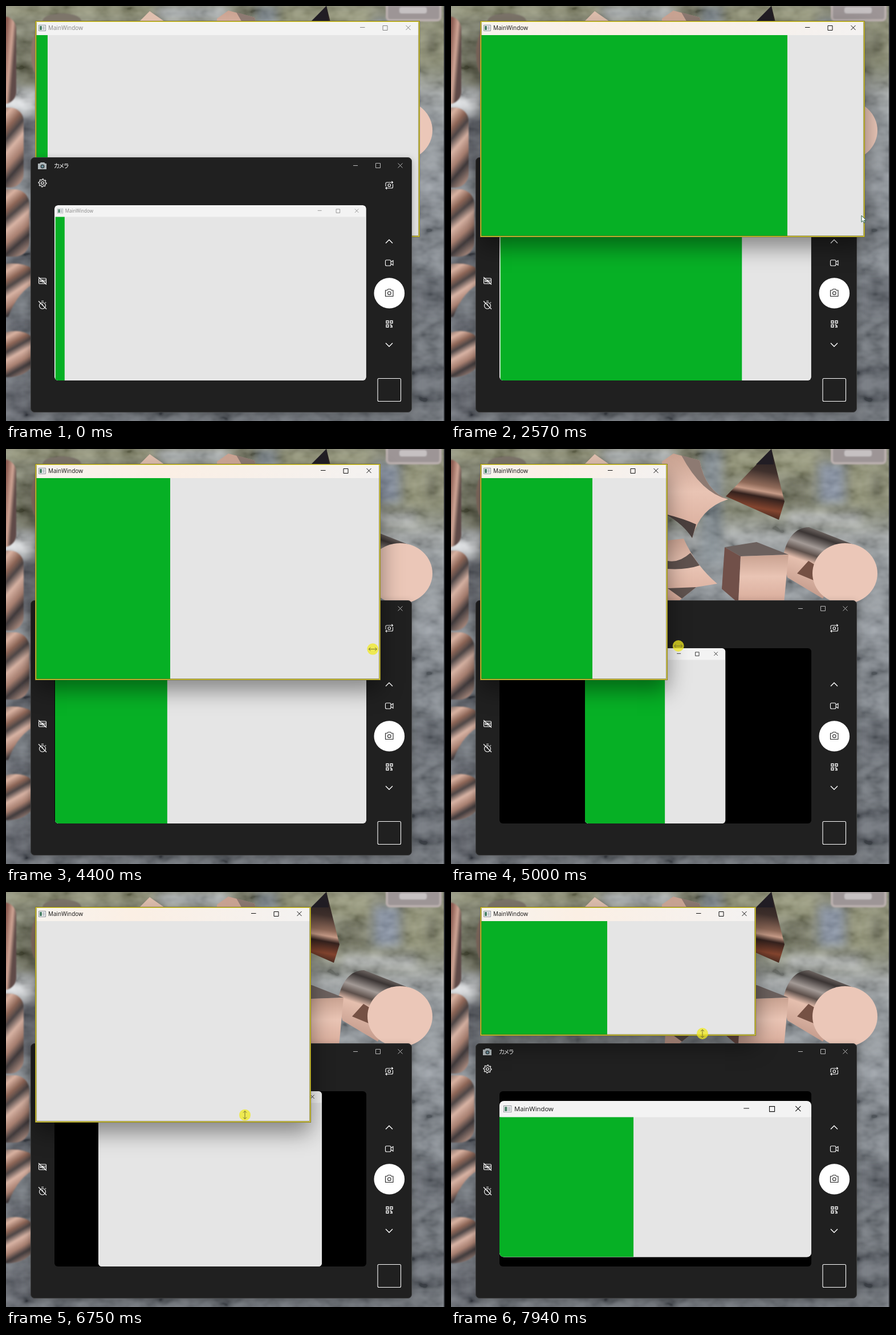
These frames come from a looping animation (770x727 px, 8 s). An HTML page:

```html
<!DOCTYPE html>
<html lang="ja">
<head>
<meta charset="utf-8">
<title>MainWindow</title>
<style>
html, body { margin: 0; width: 100%; height: 100%; overflow: hidden; background: #555a60; }
svg { position: absolute; display: block; }
#backdrop, #pointer { left: 0; top: 0; }
#pointer { z-index: 4; }
.win { position: absolute; box-sizing: border-box; overflow: hidden; display: flex; flex-direction: column; background: #f3f3f3; }
.title { position: relative; flex: 0 0 23px; background: #f3f3f3; color: #858585; font: 10px/20px "Open Sans", "Noto Sans", sans-serif; }
.title span { position: absolute; left: 21px; top: 0; }
.title .app { left: 4px; top: 5px; }
.title .buttons { right: 0; top: 0; fill: none; stroke: currentColor; }
.active .title { color: #111; }
.area { flex: 1; background: #e5e5e5; }
.bar { height: 100%; background: #06b025; }
#main { left: 51px; top: 26px; z-index: 1; border: 2px solid #e6d72c; outline: 1px solid #6f682ecc; outline-offset: -1px; }
#main::after { content: ""; position: absolute; inset: 0; border: solid #55521f99; border-width: 0 1px 1px; }
#main.active { z-index: 3; box-shadow: 0 18px 36px #0000006b; }
#main.active .title { background: linear-gradient(90deg, #f7f3ee, #fbefe4 35%, #f4f2f1); }
#camera { position: absolute; left: 43px; top: 265px; width: 669px; height: 447px; box-sizing: border-box; z-index: 2; border: 1px solid #3c3c3c; border-radius: 7px; background: #202020; box-shadow: 0 4px 14px #0004; overflow: hidden; }
#camera > svg { left: -44px; top: -266px; fill: none; stroke: #fff; stroke-width: 1.1; }
#camera h1 { position: absolute; left: 40px; top: 7px; margin: 0; color: #fff; font: 10.5px/14px "Noto Sans CJK JP", "Noto Sans CJK", sans-serif; font-feature-settings: "palt"; letter-spacing: -1px; }
#pane { position: absolute; left: 41px; top: 83px; width: 547px; height: 307px; border-radius: 6px; background: #000; overflow: hidden; }
#preview { padding: 2px 2px 0; border-radius: 7px; transform-origin: 0 0; }
#preview.flush .area { margin: 0 -2px; }
</style>
</head>
<body>
<svg id="backdrop" width="770" height="727" viewBox="0 0 770 727">
  <defs>
    <linearGradient id="sky" x2="0" y2="1">
      <stop offset="0" stop-color="#75775f"/><stop offset=".15" stop-color="#74785f"/>
      <stop offset=".21" stop-color="#9a9f9f"/><stop offset=".27" stop-color="#858c91"/>
      <stop offset=".5" stop-color="#727981"/><stop offset=".68" stop-color="#5d646c"/><stop offset="1" stop-color="#565c64"/>
    </linearGradient>
    <linearGradient id="brown" x2="1" y2=".2">
      <stop offset=".4" stop-color="#70453f"/><stop offset=".75" stop-color="#8d5e53"/>
      <stop offset=".9" stop-color="#cfa595"/><stop offset="1" stop-color="#604c48"/>
    </linearGradient>
    <linearGradient id="chrome" x1=".4" x2="1" y2=".9">
      <stop offset="0" stop-color="#625a58"/><stop offset=".18" stop-color="#d9b2a1"/><stop offset=".32" stop-color="#8d6657"/>
      <stop offset=".42" stop-color="#4d4646"/><stop offset=".55" stop-color="#d8b3a4"/><stop offset=".7" stop-color="#a77f70"/>
      <stop offset=".82" stop-color="#3f3a3c"/><stop offset="1" stop-color="#b08f82"/>
    </linearGradient>
    <linearGradient id="rose" x2="0" y2="1">
      <stop offset="0" stop-color="#c9a291"/><stop offset=".45" stop-color="#e9c4b4"/><stop offset="1" stop-color="#d8ab9a"/>
    </linearGradient>
    <linearGradient id="spike" x1=".6" x2=".45" y2="1">
      <stop offset="0" stop-color="#1f1a1c"/><stop offset=".3" stop-color="#3f302c"/><stop offset=".5" stop-color="#8f6a59"/>
      <stop offset=".58" stop-color="#c69b87"/><stop offset=".66" stop-color="#33211d"/><stop offset=".82" stop-color="#84452f"/><stop offset="1" stop-color="#271b18"/>
    </linearGradient>
    <linearGradient id="tube" x1=".45" x2=".15" y2=".9">
      <stop offset="0" stop-color="#7a716d"/><stop offset=".12" stop-color="#3b3534"/><stop offset=".28" stop-color="#a39a96"/>
      <stop offset=".4" stop-color="#5d504b"/><stop offset=".52" stop-color="#e5bfae"/><stop offset="1" stop-color="#c2998a"/>
    </linearGradient>
    <filter id="soft" x="-20%" y="-20%" width="140%" height="140%"><feGaussianBlur stdDeviation="8"/></filter>
    <filter id="smooth"><feGaussianBlur stdDeviation="1.2"/></filter>
    <filter id="mottle" x="0" y="0" width="100%" height="100%">
      <feTurbulence type="fractalNoise" baseFrequency=".025 .04" numOctaves="3" seed="4"/>
      <feColorMatrix values="1.6 0 0 0 -.3  1.6 0 0 0 -.3  1.6 0 0 0 -.3  0 0 0 0 .28"/>
    </filter>
  </defs>
  <rect width="770" height="727" fill="url(#sky)"/>
  <g filter="url(#soft)">
    <path fill="#838562" d="M0 0H260V18H0zM480 0H640V45H480zM700 25H770V100H700z"/>
    <path fill="#56583f" d="M20 60H60V140H20zM590 50H630V100H590zM735 40H758V90H735z"/>
    <path fill="#9fa4a7" d="M265 0H390V25H265z"/>
    <path fill="#69757c" d="M438 0H476V200H438z"/>
    <path fill="#78859a" d="M645 25H690V95H645z"/>
    <path fill="#e2e5e8" d="M-20 155H52V184H-20z"/>
    <path fill="#b0b4b4" d="M590 112H720V132H590z"/>
    <path fill="#444a52" d="M20 190H52V290H20zM0 430H48V470H0zM0 545H48V570H0zM0 655H45V727H0z"/>
    <path fill="#858c94" d="M725 295H770V345H725zM720 430H770V455H720z"/>
    <path fill="#495058" d="M720 475H770V545H720zM715 630H770V690H715z"/>
  </g>
  <rect width="770" height="727" filter="url(#mottle)"/>
  <g filter="url(#smooth)">
    <rect x="668" y="-8" width="94" height="33" rx="6" fill="#9d9596" stroke="#b9afad" stroke-width="4"/>
    <rect x="690" y="2" width="48" height="11" rx="4" fill="#c6c1c2"/>
    <ellipse cx="98" cy="26" rx="34" ry="13" fill="#7d746b"/>
    <path fill="#8d7467" d="M52 45Q40 70 46 105Q50 122 58 126V45z"/>
    <rect x="-50" y="18" width="68" height="154" rx="22" fill="url(#brown)"/>
    <g fill="url(#chrome)">
      <rect x="-50" y="178" width="81" height="140" rx="24"/>
      <rect x="-50" y="321" width="91" height="118" rx="26"/>
      <path d="M-50 452H-2Q28 448 46 460V488Q18 505 4 545H-50z"/>
      <path d="M-50 572H-2Q28 564 46 580V632Q28 652-2 650H-50z"/>
    </g>
  </g>
  <path fill="#dfbfae" d="M234 27 252 9 278 27z"/>
  <path fill="url(#rose)" d="M390 8 436 20Q446 74 486 88Q436 104 423 156Q408 126 370 112V22z"/>
  <path fill="#8d7a72" d="M404 11 436 20Q446 74 486 88Q440 78 404 11z"/>
  <path fill="#4b403e" d="M376 114Q408 122 430 132L423 156Q408 132 376 114z"/>
  <path fill="url(#spike)" d="M562 0 585 92 575 124 482 83z"/>
  <path fill="#211d24" d="M562 0 566 27H535z"/>
  <path fill="url(#rose)" d="M380 160 408 157Q430 205 467 236L430 242 400 266H375z"/>
  <path fill="#5f524e" d="M380 196Q400 200 420 182L436 204Q412 212 380 210zM380 244 430 242 405 262z"/>
  <path fill="url(#tube)" d="M582 190Q592 138 628 137L705 167 652 262 590 225z"/>
  <path fill="#755144" d="M607 218 627 196 642 205 636 230z"/>
  <ellipse cx="691" cy="218" rx="57" ry="53" fill="#ebc7b8"/>
  <path fill="#6c615e" d="M480 172 536 163 592 185 508 188z"/>
  <path fill="#715049" d="M480 172 508 188 504 270 475 245z"/>
  <path fill="url(#rose)" d="M508 188 592 185 584 270H504z"/>
  <rect x="768" width="2" height="727" fill="#25272b"/>
</svg>

<div id="main" class="win"></div>

<div id="camera">
  <svg width="770" height="727" viewBox="0 0 770 727">
    <g stroke="none">
      <path fill="#aeb6b9" d="M56 276H59L61 274H67L69 276H71V286H56z"/>
      <circle cx="64" cy="281" r="3.6" fill="#3e484c"/><circle cx="64" cy="281" r="1.7" fill="#6f9fae"/>
    </g>
    <path stroke="#b9b9b9" stroke-width="1" d="M609 279.500H617M648.500 275.500H656.500V283.500H648.500zM687.500 275.500 695.500 283.500M695.500 275.500 687.500 283.500"/>
    <circle cx="64" cy="310" r="2.300"/>
    <path id="gear" stroke-linejoin="round"/>
    <path d="M666 316V311Q666 309 668 309H678.500M676.500 307 678.500 309 676.500 311M678.500 312V317Q678.500 319 676.500 319H666M668 317 666 319 668 321"/>
    <circle cx="672.300" cy="314" r="2.300"/>
    <path stroke-width="1.400" d="M666 415.500 672 409.500 678 415.500M666 590.500 672 596.500 678 590.500"/>
    <rect x="665.500" y="445" width="9.500" height="10" rx="2"/><path d="M675 448.500 679 446V454L675 451.500"/>
    <circle cx="672.300" cy="503" r="26.800" fill="#fff" stroke="none"/>
    <g stroke="#222">
      <path stroke-linejoin="round" d="M665.500 498H668.500L670 496H674.500L676 498H679V508.500H665.500z"/><circle cx="672.300" cy="503" r="2.800"/>
    </g>
    <path stroke-width="1.300" d="M667 551.500H671V555.500H667zM674 551.500H678V555.500H674zM667 558.500H671V562.500H667zM673.500 558.500H675.500V560.500H678M674 562.500H678"/>
    <rect x="652" y="652.500" width="40.500" height="40" rx="2"/>
    <rect x="57.500" y="477" width="13" height="9.500" rx="1.500"/>
    <path d="M60 479.500V484M60 482H62.500M62.500 479.500V484M64.500 479.500V484Q67 482 64.500 479.500M68 484V480H69.500M57 475 71 488"/>
    <circle cx="64" cy="525" r="5.500"/><path d="M62 517H66M64 525V521.500M69 519 70 520M57 517 71 531"/>
  </svg>
  <h1>カメラ</h1>
  <div id="pane"><div id="preview" class="win"></div></div>
</div>

<svg id="pointer" width="770" height="727" viewBox="0 0 770 727">
  <g id="cursor">
    <circle id="press" r="10" fill="#f0ea20" opacity=".75"/>
    <path id="arrow" fill="#fff" stroke="#285c40" stroke-linejoin="round" d="M0 0V11.500L2.700 9 4.500 13 6.300 12.200 4.600 8.300H8z"/>
    <path id="resize" fill="none" stroke="#77722c" d="M-7 0H7M-4-3-7 0-4 3M4-3 7 0 4 3"/>
  </g>
</svg>

<script>
const LOOP = 8000, FULL_W = 675, FULL_H = 379;
const PANE_W = 547, PANE_H = 307, LAG = 70;
const ACTIVATE = 1800;
const WIDE = { from: 4330, to: 5930 };
const TALL = { from: 6680, to: LOOP };

// Each track is a list of [time, value] points.
const percent = [[0, 3], [1500, 51.2], [2570, 80.1], [3220, 100], [3250, 0], [3580, 10.2],
  [5000, 60.2], [6480, 100], [6540, 0], [6740, 0], [7940, 46]];
const width = [[4330, FULL_W], [4750, 268], [4930, 304], [5000, 328], [5500, 652], [5900, 484]];
const height = [[6680, FULL_H], [6750, 378], [7300, 190], [7640, 295], [7870, 242], [7940, 226]];
const pointerX = [[830, 516], [1500, 455], [1760, 452], [2200, 650], [2570, 720], [3000, 730], [3580, 726],
  [4250, 727], [4330, 722], [4700, 312], [5000, 398], [5450, 715], [5900, 540], [6080, 538], [6600, 419], [6750, 419], [7940, 441]];
const pointerY = [[830, -16], [1500, 48], [1760, 46], [2200, 260], [2570, 367], [3580, 393],
  [4250, 352], [5000, 345], [5900, 348], [6600, 399], [6750, 391], [7260, 208], [7600, 308], [7940, 248]];

const $ = id => document.getElementById(id);
const within = (span, t) => t >= span.from && t < span.to;

function track(points, t) {
  const next = points.findIndex(p => p[0] > t);
  if (next === 0) return points[0][1];
  if (next < 0) return points[points.length - 1][1];
  const [t0, a] = points[next - 1], [t1, b] = points[next];
  return a + (b - a) * (t - t0) / (t1 - t0);
}

const frame = `<div class="title">
  <svg class="app" width="13" height="11"><path fill="#fff" stroke="#8b9198" d="M.5.5H12.500V10.500H.5z"/>
    <path fill="#4b8068" d="M2 2H6V9H2z"/><path fill="#c3c8cc" d="M7 2H11V9H7z"/></svg>
  <span>MainWindow</span>
  <svg class="buttons" width="110" height="23"><path d="M7 9.500H15.500M47 6.500H55V14.500H47zM87.500 6 95.500 14M95.500 6 87.500 14"/></svg>
</div><div class="area"><div class="bar"></div></div>`;
for (const id of ["main", "preview"]) $(id).innerHTML = frame;

$("gear").setAttribute("d", "M" + Array.from({ length: 32 }, (_, i) => {
  const a = i * Math.PI / 16, r = i % 4 < 2 ? 7 : 5.2;
  return [64 + r * Math.cos(a), 310 + r * Math.sin(a)].map(v => v.toFixed(1)).join(" ");
}).join("L") + "z");

function drawWindow(el, t) {
  const w = Math.round(track(width, t)), h = Math.round(track(height, t));
  el.style.width = w + "px";
  el.style.height = h + "px";
  el.querySelector(".bar").style.width = Math.floor(track(percent, t)) + "%";
  el.classList.toggle("active", t >= ACTIVATE);
  return [w, h];
}

function drawPreview(t) {
  const el = $("preview");
  const [w, h] = drawWindow(el, t);
  const scale = Math.min(PANE_W / w, PANE_H / h);
  const x = Math.round((PANE_W - w * scale) / 2), y = Math.round((PANE_H - h * scale) / 2);
  el.style.transform = `translate(${x}px,${y}px) scale(${scale})`;
  el.classList.toggle("flush", t >= WIDE.from);
}

function drawPointer(t) {
  const dragging = within(WIDE, t) || within(TALL, t);
  const show = (id, on) => $(id).style.display = on ? "" : "none";
  show("press", dragging);
  show("resize", dragging);
  show("arrow", !dragging);
  $("resize").setAttribute("transform", within(TALL, t) ? "rotate(90)" : "");
  $("cursor").setAttribute("transform", `translate(${track(pointerX, t)} ${track(pointerY, t)})`);
}

function draw(now) {
  const t = now % LOOP;
  drawWindow($("main"), t);
  drawPreview(Math.max(0, t - LAG));
  drawPointer(t);
  requestAnimationFrame(draw);
}
draw(0);
</script>
</body>
</html>
```
